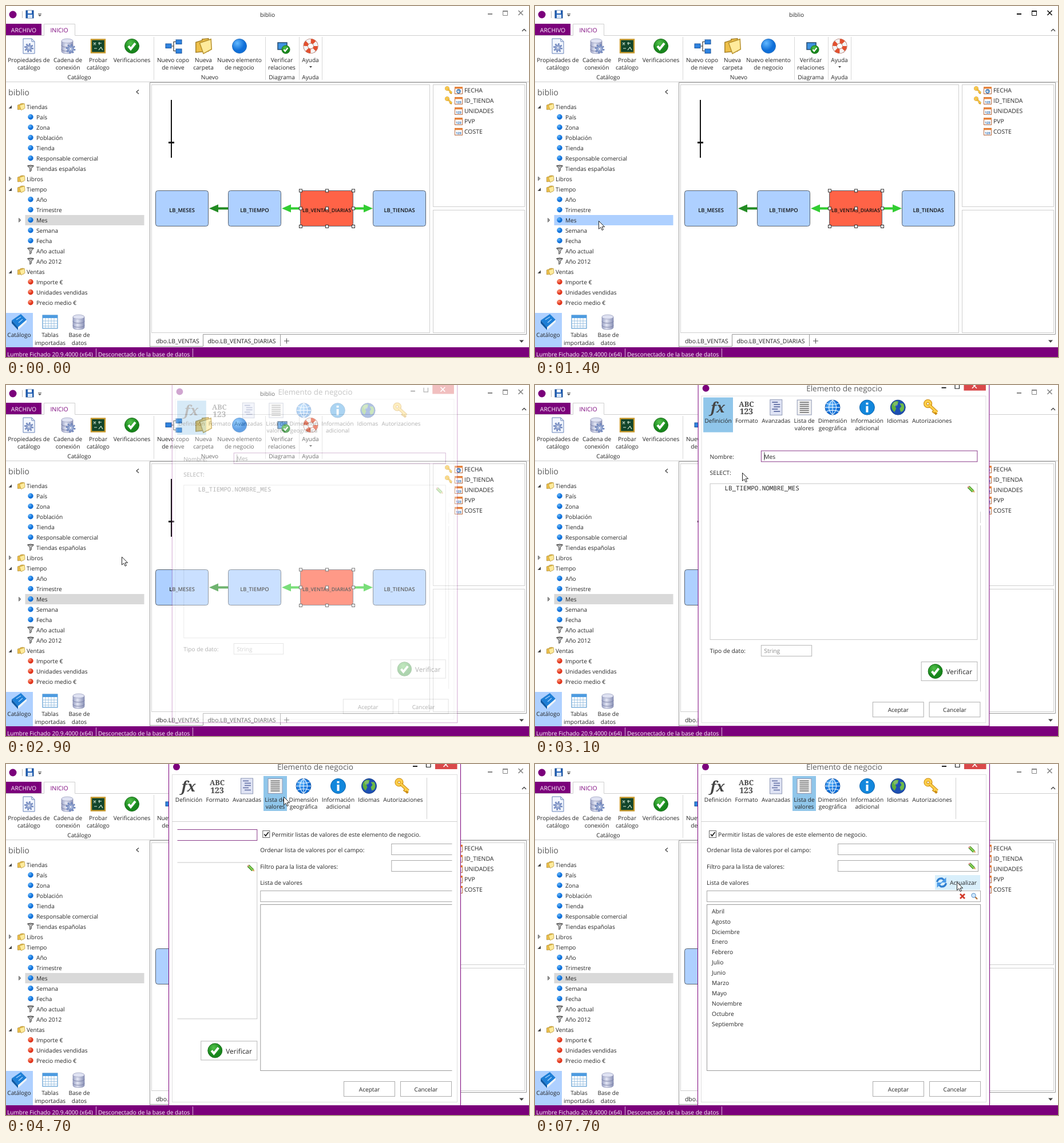
These frames come from a looping animation (914 px wide and 613 px high, 8000 ms). An HTML page:

```html
<!DOCTYPE html>
<html lang="es">
<head>
<meta charset="utf-8">
<title>biblio</title>
<style>
html, body { margin: 0; width: 100%; height: 100%; overflow: hidden; background: #fff; }
svg { display: block; width: 914px; height: 613px; }
text { font: 10.1px "Open Sans", "Noto Sans", sans-serif; fill: #262626; text-rendering: geometricPrecision; white-space: pre; }
.m { text-anchor: middle; }
.w { fill: #fff; }
.p { fill: #7b007b; }
.caps { font-size: 10.4px; }
.node { font-size: 9.4px; font-weight: 600; fill: #111; }
.long { font-size: 8.9px; }
.head { font-size: 14.3px; fill: #5c5c5c; }
.title { font-size: 13.6px; fill: #5c5c5c; }
.form text { font-size: 10.25px; }
.form .btn { font-size: 11.9px; }
.form .code { font: 500 10.9px "Noto Sans Mono", monospace; }
.serif { font-family: "Noto Serif", serif; font-weight: 700; fill: #444; }
.fx { font-size: 25px; font-style: italic; font-weight: 600; }
.abc { font-size: 12.5px; }
.digits { font-size: 14px; }
.num { font-size: 5.6px; font-weight: 700; fill: #2464a8; }
.pale { fill: #8a8a8a; }
</style>
</head>
<body>
<svg id="stage" viewBox="0 0 914 613" xmlns="http://www.w3.org/2000/svg"></svg>
<script>
const PURPLE = '#7b007b', SKY = '#aed0ff', LINE = '#cfcfcf';
const SLIDE = 479;

const text = (x, y, s, cls = '') => `<text x="${x}" y="${y}" class="${cls}">${s}</text>`;
const mid = (x, y, s, cls = '') => text(x, y, s, 'm ' + cls);
const rect = (x, y, w, h, fill = 'none', stroke = 'none', more = '') =>
  `<rect x="${x}" y="${y}" width="${w}" height="${h}" fill="${fill}" stroke="${stroke}" ${more}/>`;
const path = (d, stroke = LINE, w = 1, fill = 'none') =>
  `<path d="${d}" stroke="${stroke}" stroke-width="${w}" fill="${fill}"/>`;
const shape = (d, fill) => `<path d="${d}" fill="${fill}"/>`;
const disc = (x, y, r, fill, stroke = 'none', w = 1, more = '') =>
  `<circle cx="${x}" cy="${y}" r="${r}" fill="${fill}" stroke="${stroke}" stroke-width="${w}" ${more}/>`;
const at = (x, y, body, k = 1) => `<g transform="translate(${x} ${y}) scale(${k})">${body}</g>`;
const lines = (x, y, lead, list) => list.map((s, i) => mid(x, y + lead * i, s)).join('');

// Icons, each centred on its own origin
const FOLDER = path('M-6-3L-1-4.5V-5.5L4-6V4L-6 5Z', '#a8842c', .7, '#eec04a') +
  path('M-3-2.5L6-5.5L6.5 2.5L0 6Z', '#b8922e', .7, '#ffeb9c');
const FUNNEL = path('M-5.5-4.5Q0-6.5 5.5-4.5L1.3 .3V4L-1.2 5.8V.3Z', '#444', 1, '#c4c4c4') +
  path('M-5-4.3Q0-2.5 5-4.3', '#555', .8);
const PENCIL = path('M-5-4L3 4', '#3f8f22', 5) + path('M-4.6-3.8L3 3.8', '#8ed55a', 2.6) +
  shape('M2 5L6 6 5 2Z', '#d8a25c') + disc(-4.8, -3.8, 1.5, '#e58f8f');
const KEY = disc(-6, -6, 4.6, 'none', '#c98a10', 6) + disc(-6, -6, 4.6, 'none', '#ffcf4a', 4) +
  path('M-3-3L10 9M6 6L3 10M9 9L6 12', '#c98a10', 5.4) + path('M-3-3L10 9M6 6L4 9', '#ffcf4a', 3.4);
const GEAR = disc(0, 0, 7.4, 'none', '#6f86bd', 3, 'stroke-dasharray="2.9 2.91"') +
  disc(0, 0, 5, '#b9c6e4', '#7d92c4', 2.4) + disc(0, 0, 2.2, '#fff', '#6f86bd');
const CHECK = disc(0, 0, 12.5, 'url(#green)', '#1b6e1b') + path('M-6 0L-2 5L6-5', '#fff', 4);
const CYL = path('M-10-9V9Q-10 13 0 13T10 9V-9Z', '#8289ad', .7, 'url(#steel)') +
  path('M-10-2Q-10 2 0 2T10-2M-10 5Q-10 9 0 9T10 5', '#7c82a8') +
  `<ellipse cx="0" cy="-9" rx="10" ry="3.8" fill="#dfe2f2" stroke="#9096b8" stroke-width=".7"/>`;
const GLOBE = disc(0, 0, 13, 'url(#blue)', '#1c5aa8') +
  path('M-13 0H13M0-13V13M-11-7Q0-3 11-7M-11 7Q0 3 11 7M0-13Q-13 0 0 13M0-13Q13 0 0 13', '#e8f4ff', 1.1);
const EARTH = disc(0, 0, 13, '#1d4fb4', '#173f88') +
  shape('M-9-8Q-3-13 1-10L-1-5L-5-3L-3 2L-6 8Q-12 3-11-4Z', '#5fae3c') +
  shape('M3-7L9-7Q13 0 9 6L5 8L3 2L6-2Z', '#6cba46') + disc(-4, -6, 4, '#fff', 'none', 0, 'opacity=".2"');
const REFRESH = path('M-8-1Q-6-8 1-7L5-4M8 1Q6 8-1 7L-5 4', '#2f7fd0', 3.4) +
  shape('M8-9V0H-1Z M-8 9V0H1Z', '#4a9be8');
const LENS = path('M1 1L5 5', '#b0713a', 2.4) + disc(-1.5, -1.5, 3.6, '#cfe8ff', '#6f9fcf', 1.2);
const ARROW = path('M.5.5V14.5L3.8 11.5L6.2 16.6L8.4 15.6L6.1 10.7H10.6Z', '#222', 1, '#fff');
const CROSS = 'M-4-4L4 4M4-4L-4 4';
const TABLE = rect(-13, -12, 26, 23, '#fff', '#3b87c9') + rect(-13, -12, 26, 5, '#4d9be0') +
  path('M-13-2H13M-13 2.5H13M-13 7H13M-8-7V11M-3-7V11M2-7V11M7-7V11', '#8fb9de', .8);
const BOOK = shape('M-13-3L3-14L13-4L-2 9Z', '#1e7fd6') + shape('M-13-3L-2 9V14L-13 2Z', '#0f5aa3') +
  shape('M-2 9L13-4V0L-2 14Z', '#eef3f8') + path('M-5-4L3-9M-1 1L6-5', '#a8d4ff', 1.4);
const page = (w, h, fill) => rect(-w / 2, -h / 2, w, h, fill, '#8d97b5');

const defs = `<defs>
<radialGradient id="blue" cx=".35" cy=".3"><stop offset="0" stop-color="#62b8ff"/><stop offset="1" stop-color="#0f6fd8"/></radialGradient>
<radialGradient id="red" cx=".35" cy=".3"><stop offset="0" stop-color="#ff9a7a"/><stop offset="1" stop-color="#e0341c"/></radialGradient>
<radialGradient id="green" cx=".4" cy=".3"><stop offset="0" stop-color="#52c24a"/><stop offset="1" stop-color="#17861c"/></radialGradient>
<linearGradient id="steel"><stop offset="0" stop-color="#9aa1c4"/><stop offset=".4" stop-color="#e3e6f4"/><stop offset="1" stop-color="#8990b6"/></linearGradient>
<clipPath id="view"><rect x="299.5" y="101" width="480" height="440"/></clipPath></defs>`;

function titleBar() {
  return disc(12, 15, 6.5, PURPLE) + path('M28.5 9V21', '#bbb') +
    rect(35, 8, 13, 13, '#2260b5', '#174a8f') + rect(38, 8, 7, 5, '#fff') + rect(38, 15, 8, 6, '#d8e6f8') +
    path('M56 13.5H62', '#666') + shape('M56 15H62L59 18.5Z', '#666') + mid(457, 19, 'biblio') +
    `<g id="winCtl" fill="none" stroke-width="2"><path d="M842 14H850"/><path d="M868.5 8.5H876.5V16.5H868.5Z" stroke-width="1"/><path d="M868 9H877"/><path d="M895.5 8L903.5 16M903.5 8L895.5 16" stroke-width="1.7"/></g>`;
}

function ribbon() {
  const labels = [[40, 'Propiedades de', 'catálogo'], [108, 'Cadena de', 'conexión'], [161, 'Probar', 'catálogo'],
    [220, 'Verificaciones'], [292, 'Nuevo copo', 'de nieve'], [345, 'Nueva', 'carpeta'],
    [408, 'Nuevo elemento', 'de negocio'], [482, 'Verificar', 'relaciones'], [532, 'Ayuda']];
  const groups = [[128, 'Catálogo'], [356, 'Nuevo'], [482, 'Diagrama'], [532, 'Ayuda']];
  return rect(0, 31, 62, 20, PURPLE) + path('M0 51.5H66.5V31.5H120.5V51.5H914M0 132.5H914') +
    mid(31, 45.5, 'ARCHIVO', 'w caps') + mid(93, 45.5, 'INICIO', 'p caps') +
    path('M902 44L905.5 40.5L909 44', '#444', 1.4) +
    path([258, 453, 512, 552].map(x => `M${x}.5 54V129`).join(''), '#d8d8d8') +
    labels.map(([x, ...l]) => lines(x, 98, 12.5, l)).join('') +
    groups.map(([x, s]) => mid(x, 128, s)).join('') + shape('M530 105H535L532.5 108Z', '#444') +
    at(40, 70, path('M-10-13H5L10-8V13H-10Z', '#6480b8', 1, '#f2f6fd') + path('M5-13V-8H10', '#6480b8') + at(0, 3, GEAR, .9)) +
    at(107, 70, CYL) + at(113, 75, GEAR, .95) +
    at(161, 70, rect(-12, -11.5, 24, 23, '#12452b', '#c99a2c', 'stroke-width="2.4"') +
      path('M-8-6L-4-2M-4-6L-8-2M0-5H6M2-7V-2M-7 4H-2M1 7L5 2L8 7', '#d8ecd8', 1.2)) +
    at(220, 70, CHECK) +
    path('M289 70H293M293 70V62.5H297M293 70V78.5H297', '#333', 1.2) +
    [[279, 66], [297, 59], [297, 75]].map(([x, y]) => rect(x, y, 10, 7.5, '#2f83e0', '#1a559c')).join('') +
    at(345, 70, FOLDER, 2.2) + disc(408, 70, 12.5, 'url(#blue)', '#1662b8', .8) +
    rect(475, 64, 16, 12, '#3f93e2', '#23496f', 'stroke-width="1.5"') + at(489, 76, CHECK, .58) +
    disc(532.5, 70, 8.8, 'none', '#9a5040', 8.4) + disc(532.5, 70, 8.8, 'none', '#f4f4f4', 7.2) +
    disc(532.5, 70, 8.8, 'none', '#e2502f', 7.2, 'stroke-dasharray="6.91 6.91"');
}

// Type: F folder, C closed folder, b blue, r red, f filter
const tree = `F Tiendas|b País|b Zona|b Población|b Tienda|b Responsable comercial|f Tiendas españolas|C Libros|F Tiempo|b Año|b Trimestre|b Mes|b Semana|b Fecha|f Año actual|f Año 2012|F Ventas|r Importe €|r Unidades vendidas|r Precio medio €`.split('|');
const shut = (x, y) => path(`M${x} ${y - 3.5}L${x + 3.5} ${y}L${x} ${y + 3.5}Z`, '#777', 1, '#999');

function sidebar() {
  const rows = tree.map((row, i) => {
    const kind = row[0], name = row.slice(2), y = 176.5 + 18 * i;
    if (kind === 'F' || kind === 'C')
      return (kind === 'F' ? shape(`M10 ${y - 3}V${y + 2.5}H4.5Z`, '#444') : shut(5.5, y - 1)) +
        at(26.5, y - .5, FOLDER) + text(36, y + 3.8, name);
    const icon = kind === 'f' ? at(43, y - 1, FUNNEL) :
      disc(43, y - .8, 4.7, kind === 'b' ? 'url(#blue)' : 'url(#red)');
    return icon + text(53, y + 3.8, name);
  }).join('');
  return text(4, 156, 'biblio', 'head') + path('M232 146.5L228 150L232 153.5', '#444', 1.3) +
    rect(33.5, 365, 208, 18, '#d9d9d9', 'none', 'id="picked"') + shut(22.5, 374) + rows +
    rect(0, 536, 47, 60, SKY) + at(23, 552, BOOK) + at(77, 552, TABLE) + at(127, 552, CYL) +
    lines(23, 578, 14, ['Catálogo']) + lines(77, 578, 14, ['Tablas', 'importadas']) + lines(128, 578, 14, ['Base de', 'datos']);
}

function diagram() {
  const box = (x, name, fill = SKY, cls = '') => rect(x + .5, 322.5, 92, 62, fill, '#59636f', 'rx="4"') + mid(x + 46.5, 359.5, name, 'node ' + cls);
  const link = (tip, tail, color) => {
    const d = Math.sign(tail - tip) * 16;
    return path(`M${tip + d} 353.5H${tail}`, color, 4) + shape(`M${tip} 353.5L${tip + d} 346.5V360.5Z`, color);
  };
  let grips = '';
  for (const x of [515, 561, 607]) for (const y of [322.5, 353.5, 385])
    grips += rect(x - 2.5, y - 2.5, 5, 5, '#fff', '#333');
  const fields = ['FECHA', 'ID_TIENDA', 'UNIDADES', 'PVP', 'COSTE'].map((s, i) => {
    const y = 147 + 18 * i;
    return rect(784.5, y - 5.5, 13, 12, '#fff', '#b5683f') + rect(784, y - 6, 14, 3.5, '#e5823c') +
      (i ? mid(791, y + 4.5, '123', 'num') : disc(791, y + 2, 3, '#fff', '#2464a8', 1.3) + path(`M791 ${y}V${y + 2}H793`, '#2464a8')) +
      (i < 2 ? at(774, y, KEY, .5) : '') + text(801, y + 4, s, 'caps');
  }).join('');
  return path('M251.5 596V133.5H909.5V573.5H344.5M251.5 573.5V594.5H344.5V573.5M479.5 574V594', '#999') +
    rect(254.5, 137.5, 486, 433, '#fff', LINE) + rect(746.5, 137.5, 160, 213, '#fff', LINE) + rect(746.5, 356.5, 160, 214, '#fff', LINE) +
    path('M289 164V265', '#111', 2) + path('M284 238.5H294', '#111', 3) +
    link(355, 388, '#228b22') + link(482, 515, '#32cd32') + link(641, 607, '#32cd32') +
    box(261, 'LB_MESES') + box(388, 'LB_TIEMPO') + box(514, 'LB_VENTAS_DIARIAS', '#ff6347', 'long') + box(641, 'LB_TIENDAS') +
    grips + fields + text(262, 588.5, 'dbo.LB_VENTAS', 'caps') + text(352.5, 588.5, 'dbo.LB_VENTAS_DIARIAS', 'caps') +
    path('M486 585H495M490.5 580.5V589.5', '#555', 1.1) + shape('M897 583.5H905L901 588Z', '#444');
}

function statusBar() {
  return rect(0, 596, 914, 17, PURPLE) + text(2, 611.5, 'Lumbre Fichado 20.9.4000 (x64)', 'w') +
    text(161, 611.5, 'Desconectado de la base de datos', 'w') + path('M157.5 598V613M326.5 598V613', '#dcb8dc');
}

const tabs = [[319.5, 52, 'Definición'], [369.5, 42, 'Formato'], [421, 52, 'Avanzadas'], [470.5, 41, 'Lista de', 'valores'],
  [520, 52, 'Dimensión', 'geográfica'], [580.5, 58, 'Información', 'adicional'], [634, 40, 'Idiomas'], [694, 72, 'Autorizaciones']];

function dialogFrame() {
  const button = (x, s) => rect(x + .5, 554.5, 89, 26, '#fff', '#adadad') + mid(x + 45, 572, s);
  const rules = Array.from({ length: 6 }, (_, i) => `M-8 ${-9 + i * 3.5}H8`).join('');
  return rect(284.5, -20, 510, 616.5, '#fff', PURPLE) +
    rect(290.5, 18.5, 498, 572, 'none', '#dedede') + `<g id="rules">${path('M290 100.5H789M735.5 24V96', '#d0d0d0')}</g>` +
    disc(298, 5, 6, PURPLE) + mid(540.5, 10, 'Elemento de negocio', 'title') +
    path('M711 4H719', '#222', 2) + path('M734.5-2V5.5H742V-2', '#222', 1.2) +
    rect(750, -10, 38.5, 19, '#d9494a') + at(768.5, 1, path(CROSS, '#fff', 1.6)) +
    tabs.map(([x, w], i) => rect(x - w / 2, 21, w, 61, 'none', 'none', `id="tab${i}"`)).join('') +
    tabs.map(([x, , ...l]) => lines(x, 65.5, 12.5, l)).join('') +
    mid(319, 47.5, 'fx', 'serif fx') + mid(369, 37, 'ABC', 'serif abc') + mid(369, 50.5, '123', 'serif digits') +
    at(421, 38.5, page(21, 27, '#dfe3f4') + path('M-7-9H3M-4-5H7M-4-1H7M-7 3H3M-4 7H7', '#5f6da3', 1.7)) +
    at(470.5, 38.5, page(25, 26, '#f1f1f1') + path(rules, '#666', 1.5)) +
    at(520, 38.5, GLOBE) + disc(580.5, 38.5, 13, '#1287dc', '#0d63ac') + path('M580.5 36V47M580.5 30V33.5', '#fff', 4) +
    at(634.5, 38.5, EARTH) + at(693, 38, KEY) + button(590, 'Aceptar') + button(689, 'Cancelar');
}

function definition() {
  return text(305, 129, 'Nombre:') + rect(395, 114.5, 378.5, 19, '#fff', '#8a3a8a') + text(400, 128.5, 'Mes') + path('M400.5 117V131', '#444') +
    text(305, 157, 'SELECT:') + rect(305.5, 172, 468, 273, '#fff', '#c8c8c8') + text(331, 183.4, 'LB_TIEMPO.NOMBRE_MES', 'code') + at(763, 181.5, PENCIL) +
    text(305, 468.5, 'Tipo de dato:') + rect(395, 455, 88.5, 19, '#fff', '#b5b5b5') + text(400, 468.5, 'String', 'pale') +
    rect(675.5, 484, 98, 33, '#fff', '#b5b5b5') + at(700, 500.5, CHECK) + text(719, 505.5, 'Verificar', 'btn');
}

const months = ['Abril', 'Agosto', 'Diciembre', 'Enero', 'Febrero', 'Julio', 'Junio', 'Marzo', 'Mayo', 'Noviembre', 'Octubre', 'Septiembre'];

function valueList() {
  const field = y => rect(529.5, y, 245, 19, '#fff', '#a8a8a8') + at(764, y + 9.5, PENCIL);
  return rect(304.5, 116.5, 12, 12, '#fff', '#666') + path('M307 122.5L309.5 125.5L314.5 119', '#222', 1.8) +
    text(320, 127, 'Permitir listas de valores de este elemento de negocio.') +
    text(300, 153.5, 'Ordenar lista de valores por el campo:') + field(139.5) +
    text(300, 182.5, 'Filtro para la lista de valores:') + field(168.5) + text(300, 211, 'Lista de valores') +
    rect(699, 194, 79, 26, 'none', 'none', 'id="update"') + at(710.5, 207, REFRESH) + text(725, 211, 'Actualizar') +
    rect(300.5, 221.5, 478, 19, '#fff', '#a8a8a8') + at(747, 231, path(CROSS, '#d23a2a', 2.8)) + at(768, 231, LENS) +
    rect(300.5, 245.5, 478, 290, '#fff', '#9a9a9a') +
    `<g id="months">${months.map((s, i) => text(309, 260.7 + 17.9 * i, s)).join('')}</g>`;
}

const stage = document.getElementById('stage');
stage.innerHTML = defs + titleBar() + ribbon() + sidebar() + diagram() + statusBar() +
  `<g id="dialog">${dialogFrame()}<g class="form" clip-path="url(#view)"><g id="slider">${definition()}${at(SLIDE, 0, valueList())}</g></g></g>` +
  `<g id="arrow">${ARROW}</g><g id="busy">${disc(0, 0, 6.8, 'none', '#8cc6f8', 4)}${disc(0, 0, 6.8, 'none', '#1784e6', 4, 'stroke-dasharray="27 15.7"')}</g>`;

const $ = id => document.getElementById(id);
const put = (id, name, v) => $(id).setAttribute(name, v);
const show = (id, on) => put(id, 'visibility', on ? 'visible' : 'hidden');
const clamp = v => Math.max(0, Math.min(1, v));

// Pointer stops: time, x, y
const stops = [[200, 13, 0], [800, 111, 368], [900, 111, 368], [1100, 111, 375], [1400, 111, 375], [1800, 122, 373],
  [2800, 122, 373], [3100, 362, 153], [3500, 420, 114], [3600, 420, 114], [3800, 430, 76], [4100, 485, 57],
  [4700, 485, 57], [5400, 485, 75], [5700, 485, 75], [5900, 469, 71], [6300, 469, 71], [6400, 747, 170],
  [6500, 747, 170], [6900, 743, 218], [7200, 737, 206], [8000, 737, 206]];

function pointer(t) {
  const i = Math.max(1, stops.findIndex(s => s[0] >= t));
  const [t0, x0, y0] = stops[i - 1], [t1, x1, y1] = stops[i];
  const u = clamp((t - t0) / (t1 - t0));
  return [x0 + (x1 - x0) * u, y0 + (y1 - y0) * u];
}

function draw(t) {
  const [x, y] = pointer(t);
  const busy = t >= 2000 && t < 2900;
  show('arrow', t >= 200 && !busy && t !== 6300);
  put('arrow', 'transform', `translate(${x} ${y})`);
  show('busy', busy);
  put('busy', 'transform', `translate(130 381) rotate(${(t - 2300) * .45 - 60})`);
  put('winCtl', 'stroke', t >= 1300 && t < 2900 ? '#111' : '#858585');
  put('picked', 'fill', t >= 1300 && t < 2000 ? SKY : t >= 800 && t < 1300 ? '#c9dffc' : '#d9d9d9');

  const u = clamp((t - 2800) / 400), k = 1 - .04 * (1 - u) ** 2;
  show('dialog', t >= 2900);
  put('dialog', 'opacity', clamp(u * 1.4));
  put('dialog', 'transform', `translate(540 300) scale(${k}) translate(-540 -300)`);
  put('rules', 'opacity', t >= 3300 ? 1 : 0);

  const active = t < 4300 ? 0 : 3;
  tabs.forEach(([cx, w], i) => {
    const over = t >= 3700 && t < 5400 && y < 82 && Math.abs(x - cx) < w / 2;
    put('tab' + i, 'fill', i === active ? '#90c6ea' : over ? '#d6ecf9' : 'none');
  });
  const slide = 1 - (1 - clamp((t - 4400) / 910)) ** 3;
  put('slider', 'transform', `translate(${-SLIDE * slide} 0)`);
  put('update', 'fill', t >= 6700 ? '#d9effb' : 'none');
  put('months', 'opacity', t >= 7500 ? 1 : 0);
}

const start = performance.now();
function tick() {
  const t = (performance.now() - start) % 8000;
  draw(Math.floor(t / 100) * 100);
  requestAnimationFrame(tick);
}
tick();
</script>
</body>
</html>
```
